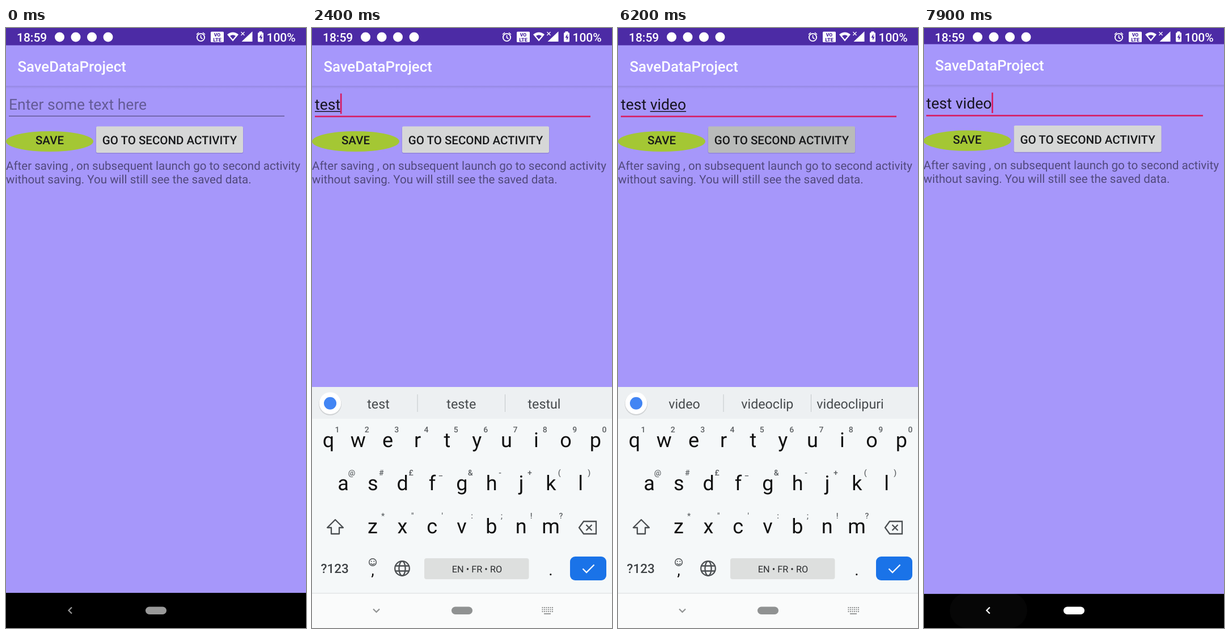
These frames come from a looping animation (529x1058 px, 8000 ms). An HTML page:

```html
<!DOCTYPE html>
<html lang="en">
<head>
<meta charset="utf-8">
<title>Save data demo</title>
<style>
  html, body { margin: 0; width: 100%; height: 100%; overflow: hidden; background: #f7f9f7; }
  svg { display: block; width: 100vw; height: 100vh; }
  text { font-family: Roboto, sans-serif; white-space: pre; text-rendering: geometricPrecision; }
  .mid { text-anchor: middle; }
  .medium { font-weight: 500; }
  .line { fill: none; stroke: #4b4f52; stroke-width: 2.3; }
  #main, #second, #keyboard { transform-origin: 264.5px 529px; }
</style>
</head>
<body>
<svg id="stage" viewBox="0 0 529 1058">
  <defs>
    <linearGradient id="shade" x2="0" y2="1">
      <stop stop-opacity=".1"/><stop offset="1" stop-opacity="0"/>
    </linearGradient>
  </defs>
  <g id="main"></g>
  <rect id="dim" width="529" height="1058"/>
  <g id="second"></g>
  <g id="keyboard"></g>
  <g id="nav"></g>
  <g id="status"></g>
</svg>
<script>
const LOOP = 8000;
const $ = id => document.getElementById(id);

const rect = (x, y, w, h, fill, more = '') =>
  `<rect x="${x}" y="${y}" width="${w}" height="${h}" fill="${fill}" ${more}/>`;
const circle = (x, y, r, fill, more = '') =>
  `<circle cx="${x}" cy="${y}" r="${r}" fill="${fill}" ${more}/>`;
const path = (d, more = 'class="line"') => `<path d="${d}" ${more}/>`;
const text = (x, y, size, fill, str, more = '') =>
  `<text x="${x}" y="${y}" font-size="${size}" fill="${fill}" ${more}>${str.replace(/&/g, '&amp;')}</text>`;
const mid = (x, y, size, fill, str, weight = 400) =>
  text(x, y, size, fill, str, `class="mid" font-weight="${weight}"`);

const windowFrame = body =>
  rect(0, 0, 529, 1058, body) +
  rect(0, 30, 529, 72, '#a697fb') +
  rect(0, 102, 529, 5, 'url(#shade)') +
  rect(0, 0, 529, 30.5, '#4c2ba5') +
  text(20.4, 77, 25.8, '#fff', 'SaveDataProject', 'class="medium"') +
  rect(0, 996, 529, 62, '#000');

$('main').innerHTML = windowFrame('#a697fa') +
  text(5, 144, 26.5, 'rgba(0,0,0,.4)', 'Enter some text here', 'id="hint"') +
  text(5, 144, 26.5, '#16131f', '', 'id="entry"') +
  rect(0, 146.5, 0, 1.5, '#16131f', 'id="composing"') +
  rect(5, 154.7, 486, 1.3, '#5a5088', 'id="underline"') +
  rect(5, 115.5, 2.6, 36, '#d81b60', 'id="caret"') +
  '<ellipse cx="77" cy="200" rx="77" ry="18" fill="#a4c734"/>' +
  mid(77, 205, 20.5, '#17181a', 'SAVE', 500) +
  rect(158.5, 174.5, 260, 47, '#000', 'rx="3" opacity=".13"') +
  rect(159, 173.5, 259, 46.5, '#d6d7d7', 'rx="2.5" id="go"') +
  mid(288.5, 205, 20.5, '#17181a', 'GO TO SECOND ACTIVITY', 500) +
  text(0, 250, 20.55, '#51497d', 'After saving , on subsequent launch go to second activity') +
  text(0, 274, 20.55, '#51497d', 'without saving. You will still see the saved data.');

$('second').innerHTML = windowFrame('#f7f9f7') +
  text(16.3, 155.6, 20.55, '#747674', 'test video') +
  text(21.8, 212.6, 20.55, '#747674', 'true');

// Keyboard
const PITCH = 52.33;
const keyRow = (x0, y, keys, hints, hintDx) => [...keys].map((key, i) => {
  const x = x0 + i * PITCH;
  return mid(x, y, 36, '#111', key) + mid(x + hintDx, y - 26, 14, '#5c6063', hints[i], 500);
}).join('');

const gear = () => {
  let teeth = '';
  for (let a = 0; a < 360; a += 60)
    teeth += rect(-3, -11, 6, 6, '#54585b', `rx="1" transform="translate(332 662) rotate(${a})"`);
  return teeth + circle(332, 662, 6, 'none', 'stroke="#54585b" stroke-width="4.6"');
};

const tools =
  path('M95 652h14q3 0 3 3v9l-7 7h-10q-3 0-3-3v-13q0-3 3-3zM105 671v-7h7M97 662q4 6 8 2') +
  circle(98, 658, 1.4, '#4b4f52') + circle(106, 658, 1.4, '#4b4f52') +
  mid(178, 668, 18, '#54585b', 'GIF', 900) +
  path('M247 653h18v18h-18zM251 659h10M251 663h10M251 667h7') +
  rect(251, 650, 10, 5, '#4b4f52', 'rx="1.5"') +
  gear() +
  rect(378.5, 648, 1, 28, '#c6cacc') +
  [418, 426, 434].map(x => circle(x, 662, 2.7, '#54585b')).join('');

const words = [117, 263.3, 409.5].map((x, i) =>
  text(x, 671, 23.25, '#45494c', '', `class="mid" id="word${i}"`)).join('') +
  rect(185.5, 646, 1, 31, '#c3c7c9') + rect(340, 646, 1, 31, '#c3c7c9');

$('keyboard').innerHTML =
  rect(0, 633, 529, 425, '#f5f8f9') +
  rect(0, 633, 529, 56, '#edf0f2') +
  rect(0, 996, 529, 1.5, '#dfe2e3') +
  rect(0, 997.5, 529, 61, '#fafbfb') +
  circle(32, 663, 20, '#000', 'opacity=".12"') +
  circle(32, 661.7, 19.3, '#fff') + circle(32, 661.7, 11, '#4285f4') +
  `<g id="tools">${tools}</g><g id="words">${words}</g>` +
  keyRow(29, 739, 'qwertyuiop', '1234567890', 15.5) +
  keyRow(55, 815, 'asdfghjkl', '@#£_&-+()', 15) +
  keyRow(107, 891, 'zxcvbnm', '*"\':;!?', 18) +
  path('M41 867l14 14h-7v11h-14v-11h-7z', 'class="line" stroke-linejoin="round"') +
  path('M479 870h22v22h-22l-8-11zM483.5 876l10 10M493.5 876l-10 10') +
  text(15.5, 961, 22.5, '#3f4346', '?123', 'class="medium"') +
  circle(107, 942, 6.3, 'none', 'stroke="#4b4f52" stroke-width="1.5"') +
  circle(104.7, 940.5, 1, '#4b4f52') + circle(109.3, 940.5, 1, '#4b4f52') +
  path('M103.5 944q3.5 4 7 0', 'class="line" style="stroke-width:1.3"') +
  mid(107, 965, 28, '#111', ',') + mid(421, 965, 28, '#111', '.') +
  circle(159, 953, 12.8, 'none', 'class="line"') +
  '<ellipse cx="159" cy="953" rx="5.6" ry="12.8" class="line"/>' +
  path('M147.5 948.5h23M147.5 957.5h23') +
  rect(198, 935, 184.5, 37, '#dddfde', 'rx="4"') +
  mid(291, 959.5, 16.3, '#2b2d2f', 'EN • FR • RO') +
  rect(455, 932, 64, 42, '#1a73e8', 'rx="9"') +
  path('M477.5 953.5l6.5 6.5l13.5-13.5', 'fill="none" stroke="#fff" stroke-width="2.3"');

// System bars
let dots = rect(409, 1032, 12, 1.8, '#909292');
for (let i = 0; i < 18; i++)
  dots += rect(405.5 + i % 6 * 3.5, 1021 + Math.floor(i / 6) * 3.5, 2, 2, '#909292');

$('nav').innerHTML =
  rect(45.5, 996, 136.5, 62, '#fff', 'rx="31" id="ripple"') +
  path('M116 1021.5l-5.5 5.5l5.5 5.5', 'id="back" fill="none" stroke-width="2.2"') +
  rect(246, 1020.5, 37, 13.5, '#999', 'rx="6.75" id="pill"') +
  `<g id="dots">${dots}</g>`;

$('status').innerHTML =
  text(19, 23.5, 21, '#fff', '18:59', 'class="medium"') +
  [94.5, 123, 151.5, 180].map(x => circle(x, 16, 8.5, '#fff')).join('') +
  circle(343.5, 16.5, 6.6, 'none', 'stroke="#fff" stroke-width="1.9"') +
  path('M343.5 12.5v4.5l3 2M336 11.5l4-3.5M351 11.5l-4-3.5', 'fill="none" stroke="#fff" stroke-width="1.6"') +
  rect(361, 6.5, 23, 18.5, '#fff', 'rx="1.5"') +
  mid(372.5, 14.5, 8.5, '#4c2ba5', 'VO', 800) + mid(372.5, 23.5, 9, '#4c2ba5', 'LTE', 800) +
  path('M390 11.5q10-8 20 0l-10 12z', 'fill="#fff"') +
  path('M395 14q5-3.5 10 0l-5 6z', 'fill="#4c2ba5"') +
  path('M414.5 7l6 6M420.5 7l-6 6', 'fill="none" stroke="#fff" stroke-width="1.3"') +
  path('M434.5 6v18h-19z', 'fill="#fff"') +
  rect(444, 8, 10, 16.5, '#fff', 'rx="1.5"') + rect(446.5, 6, 5, 3, '#fff') +
  path('M450.5 10.5l-4 6.5h2.5v5l3.5-6.5h-2.5z', 'fill="#4c2ba5"') +
  text(459.5, 23.5, 21, '#fff', '100%', 'class="medium"');

// Tables of steps: [start ms, value...]
const typing = [[0, ''], [1800, 't'], [2000, 'te'], [2200, 'tes'], [2400, 'test'], [2600, 'test '],
  [3200, 'test v'], [3800, 'test vi'], [4000, 'test vid'], [4200, 'test vide'], [4500, 'test video']];
const caretSteps = [[0, 0], [500, 1], [1000, 0], [1500, 1], [3100, 0], [3200, 1], [3700, 0],
  [3800, 1], [5000, 0], [5500, 1], [6000, 0], [7600, 1]];
const goSteps = [[0, '#d6d7d7'], [6100, '#c8c9c9'], [6200, '#b9bbba'], [6600, '#d6d7d7']];
// scale, opacity, dim
const mainSteps = [[0, 1, 1, 0], [6300, 1.02, 1, .1], [6400, 1.0425, 1, .2], [6600, 1, 1, 0],
  [7700, 1.1, .5, 0], [7800, 1.03, 1, 0], [7900, 1.004, 1, 0]];
// scale, opacity
const secondSteps = [[0, 1, 0], [6300, .93, .55], [6400, .985, 1], [6500, .996, 1], [6600, 1, 1],
  [7700, .9975, 1], [7800, .95, .3], [7900, 1, 0]];
// scale, shift, opacity
const keyboardSteps = [[0, 1, 0, 0], [900, 1, 36, .45], [1000, 1, 10, .85], [1100, 1, 0, 1],
  [6300, 1.02, 2, .95], [6400, 1.0425, 8, .7], [6500, 1.055, 18, .25], [6600, 1, 0, 0]];
// back arrow angle, colour
const navSteps = [[0, 0, '#999'], [900, -45, '#999'], [1000, -90, '#909292'],
  [6400, -45, '#dcdddc'], [6500, 0, '#e2e3e2'], [7800, 0, '#fff']];
const rippleSteps = [[0, 0], [7600, .06], [7700, .12], [7800, .08], [7900, .025]];

const suggestions = {
  '': ['de', 'la', 'pentru'], t: ['t', 'te', 'tu'], te: ['te', 'tu', 'ten'],
  tes: ['tes', 'test', 'teste'], test: ['test', 'teste', 'testul'],
  v: ['v', 'va', 'voi'], vi: ['vi', 'via', 'vin'], vid: ['vid', 'video', 'vida'],
  vide: ['vide', 'video', 'videoclip'], video: ['video', 'videoclip', 'videoclipuri']
};

const at = (steps, t) => steps.findLast(step => step[0] <= t).slice(1);
const set = (id, attrs) => {
  for (const name in attrs) $(id).setAttribute(name, attrs[name]);
};
const place = (id, scale, opacity, shift = 0) => {
  $(id).style.transform = `translateY(${shift}px) scale(${scale})`;
  $(id).style.opacity = opacity;
};
const measure = str => {
  $('entry').textContent = str;
  return str ? $('entry').getComputedTextLength() : 0;
};

function drawField(t) {
  const [typed] = at(typing, t);
  const focused = t >= 500;
  const wordStart = typed.lastIndexOf(' ') + 1;
  const word = typed.slice(wordStart);
  const from = measure(typed.slice(0, wordStart));
  const width = measure(typed);
  set('hint', { opacity: typed ? 0 : 1 });
  set('composing', { x: 5 + from, width: t < 7600 ? width - from : 0 });
  set('underline', { fill: focused ? '#d81b60' : '#5a5088', height: focused ? 2.6 : 1.3 });
  set('caret', { x: 4.8 + width, opacity: at(caretSteps, t)[0] });
  set('tools', { opacity: typed ? 0 : 1 });
  set('words', { opacity: typed ? 1 : 0 });
  suggestions[word].forEach((str, i) => { $('word' + i).textContent = str; });
}

function draw(t) {
  drawField(t);
  const [scale, opacity, dim] = at(mainSteps, t);
  place('main', scale, opacity);
  set('dim', { opacity: dim });
  place('second', ...at(secondSteps, t));
  const [kbScale, shift, kbOpacity] = at(keyboardSteps, t);
  place('keyboard', kbScale, kbOpacity, shift);
  const [angle, colour] = at(navSteps, t);
  set('back', { transform: `rotate(${angle} 113.5 1027)`, stroke: colour });
  set('pill', { fill: colour });
  set('dots', { opacity: t >= 1000 && t < 6400 ? 1 : 0 });
  set('ripple', { opacity: at(rippleSteps, t)[0] });
  set('go', { fill: at(goSteps, t)[0] });
}

const start = performance.now();
let shown = -1;
function tick() {
  const t = Math.floor((performance.now() - start) % LOOP / 100) * 100;
  if (t !== shown) draw(shown = t);
  requestAnimationFrame(tick);
}
tick();
</script>
</body>
</html>
```
